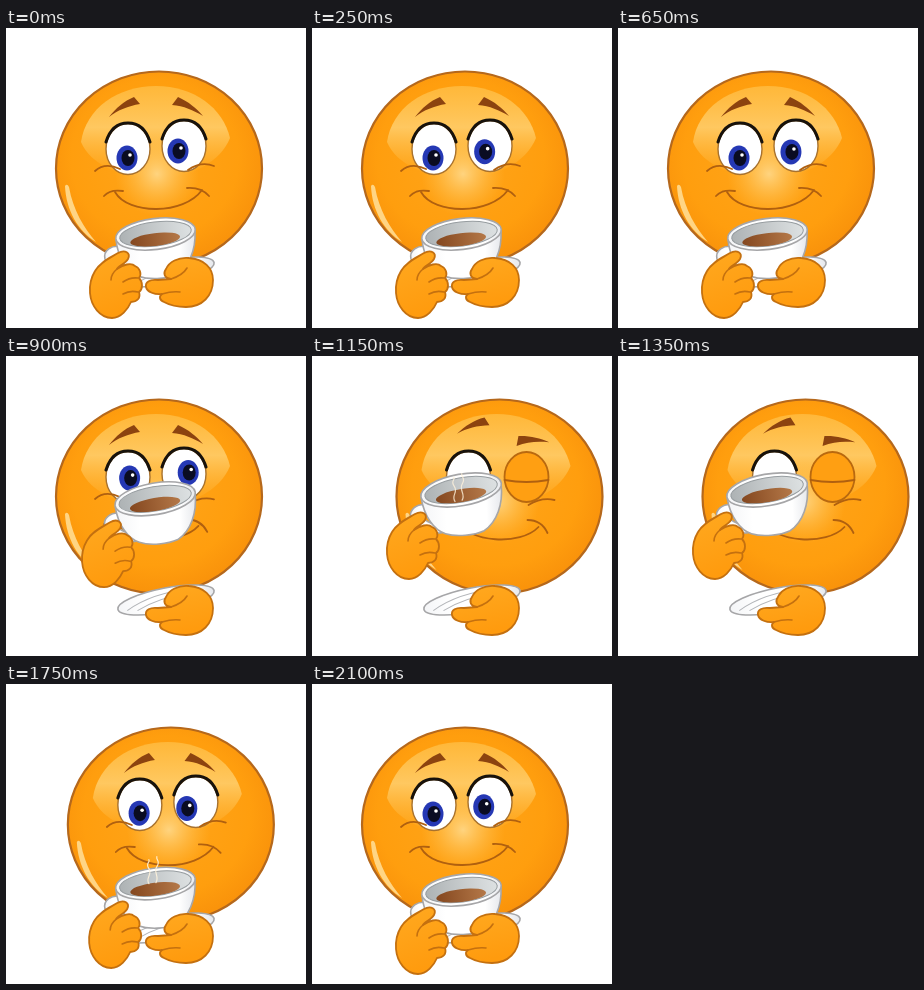
An HTML page for the animation above (2200 ms loop, 300 by 300 pixels).

```html
<!DOCTYPE html>
<html lang="en">
<head>
<meta charset="utf-8">
<title>Coffee break</title>
<style>
  html, body { margin: 0; width: 100%; height: 100%; overflow: hidden; background: #fff; }
  svg { display: block; width: 100vw; height: 100vh; }
  .ink, .fold { fill: none; stroke: #b0600f; stroke-width: 1.8; stroke-linecap: round; }
  .fold { stroke: #c4700f; stroke-width: 1.6; }
  .skin { fill: url(#hand); stroke: #c4700f; stroke-width: 1.8; stroke-linejoin: round; }
  .china { fill: url(#china); stroke: #a6a6a8; stroke-width: 1.6; stroke-linejoin: round; }
  .brow { fill: #8c430f; }
</style>
</head>
<body>
<svg viewBox="0 0 300 300">
  <defs>
    <radialGradient id="face" cx=".48" cy=".45" r=".58">
      <stop offset="0" stop-color="#ffa51a"/>
      <stop offset=".7" stop-color="#ff9e0e"/>
      <stop offset="1" stop-color="#f8900a"/>
    </radialGradient>
    <linearGradient id="shine" x1="0" y1="0" x2="0" y2="1">
      <stop offset="0" stop-color="#ffc550" stop-opacity=".65"/>
      <stop offset=".45" stop-color="#ffd274" stop-opacity=".8"/>
      <stop offset="1" stop-color="#ffc04a" stop-opacity="0"/>
    </linearGradient>
    <radialGradient id="glow">
      <stop offset="0" stop-color="#ffd98a" stop-opacity=".9"/>
      <stop offset="1" stop-color="#ffc04a" stop-opacity="0"/>
    </radialGradient>
    <linearGradient id="hand" x1="0" y1="0" x2=".3" y2="1">
      <stop offset="0" stop-color="#ffa920"/>
      <stop offset="1" stop-color="#ff9b0e"/>
    </linearGradient>
    <linearGradient id="china">
      <stop offset="0" stop-color="#f4f5f7"/>
      <stop offset=".3" stop-color="#fff"/>
      <stop offset=".8" stop-color="#fff"/>
      <stop offset="1" stop-color="#e6e8ec"/>
    </linearGradient>
    <linearGradient id="inside">
      <stop offset="0" stop-color="#adb2b4"/>
      <stop offset="1" stop-color="#dde1e2"/>
    </linearGradient>
    <linearGradient id="coffee">
      <stop offset="0" stop-color="#84471f"/>
      <stop offset="1" stop-color="#b47848"/>
    </linearGradient>
    <clipPath id="eyeClip"><ellipse rx="22" ry="25.5"/></clipPath>
    <clipPath id="rimClip"><ellipse rx="36" ry="12"/></clipPath>
    <ellipse id="white" rx="22" ry="25.5" fill="#fff" stroke="#a8722e" stroke-width="1.4"/>
    <path id="lash" d="M-22 -7C-18 -20 -10 -26 0 -26S18 -20 22 -7" fill="none" stroke="#17120c" stroke-width="3" stroke-linecap="round"/>
    <g id="ball">
      <ellipse rx="10.5" ry="12.5" fill="#2538b4"/>
      <ellipse cx="1" rx="6.5" ry="8" fill="#0a0c22"/>
      <circle cx="3" cy="-3" r="1.8" fill="#fff"/>
    </g>
  </defs>

  <g id="head">
    <ellipse cx="153" cy="140.500" rx="103" ry="97" fill="url(#face)" stroke="#b5681c" stroke-width="2.200"/>
    <path d="M75 114C80 80 112 58 150 58S217 80 224 110C215 133 186 150 150 150S84 136 75 114Z" fill="url(#shine)"/>
    <circle cx="151" cy="146" r="42" fill="url(#glow)"/>
    <path d="M59 158C60 182 72 203 90 214C78 200 67 182 63 159Q61 155 59 158Z" fill="#ffd584"/>
    <path id="browL" class="brow" d="M103 89C110 80 118 73 128 69L134 76C122 78 112 82 103 89Z"/>
    <path id="browR" class="brow" d="M172 69C183 74 190 80 197 88C187 82 178 78 166 77Z"/>
    <g transform="translate(122 121)">
      <use href="#white"/>
      <g clip-path="url(#eyeClip)"><use id="ballL" href="#ball"/></g>
      <use href="#lash"/>
    </g>
    <g transform="translate(178 118)">
      <g id="open">
        <use href="#white"/>
        <g clip-path="url(#eyeClip)"><use id="ballR" href="#ball"/></g>
        <use href="#lash"/>
      </g>
      <g id="shut" transform="translate(2 3)">
        <ellipse rx="22" ry="25" fill="#ff9f12" stroke="#b9690f" stroke-width="1.800"/>
        <path class="ink" d="M-22 3Q0 7 22 3"/>
      </g>
    </g>
    <path class="ink" d="M89 143Q99 134 114 141M98 168Q104 161 117 163"/>
    <path class="ink" id="smile"/>
  </g>

  <g transform="translate(160 244) rotate(-11)">
    <ellipse class="china" rx="49" ry="12"/>
    <path d="M-40 3Q-12 -10 28 -6M-30 5Q-6 -4 20 -2" fill="none" stroke="#b4b6ba"/>
  </g>

  <g id="cup">
    <path class="china" d="M117 219C105 216 97 223 99 231C102 240 116 247 128 247L127 240C118 238 110 233 110 229Q112 225 120 228Z"/>
    <path class="china" d="M110 212C112 230 121 244 132 248C143 252 160 251 170 247C183 239 190 222 189 203Z"/>
    <g transform="translate(149.500 206) rotate(-7)">
      <ellipse class="china" rx="40" ry="15.500"/>
      <ellipse rx="36" ry="12" fill="url(#inside)" stroke="#979da0"/>
      <ellipse cx="-1" cy="5.500" rx="25" ry="6.500" fill="url(#coffee)" clip-path="url(#rimClip)"/>
    </g>
    <path id="steam" d="M143 205C139 199 147 196 143 190S145 184 143 181M150 204C154 198 147 194 151 188S150 182 151 178"
      fill="none" stroke="#fff3dc" stroke-width="1.200" stroke-linecap="round"/>
  </g>

  <g id="handL">
    <path class="skin" d="M89 243C94 234 104 230 112 225C119 221 125 225 122 231C119 236 112 238 111 241C117 237 125 234 129 238C134 240 136 246 133 250C137 254 137 261 133 264C135 270 131 274 125 274C122 281 115 290 106 290C94 290 85 278 84 265Q83 253 89 243Z"/>
    <path class="fold" d="M111 241Q105 246 105 252M132 250Q124 249 117 254M132 264Q124 262 117 266"/>
  </g>
  <g>
    <path class="skin" d="M160 241C163 234 172 229 183 230C198 231 207 240 207 252C207 268 196 279 180 279Q167 279 158 274C153 272 153 268 156 266C149 267 141 264 140 259S144 251 152 252L165 251C158 250 157 245 160 241Z"/>
    <path class="fold" d="M165 251Q177 247 181 240M156 266Q166 263 174 264"/>
  </g>
</svg>
<script>
  const LOOP = 2200, STEP = 50;
  const el = id => document.getElementById(id);

  function ease(t, from, to) {
    const p = Math.min(1, Math.max(0, (t - from) / (to - from)));
    return p * p * (3 - 2 * p);
  }
  // Rises from 0 to 1 over a..b and falls back over c..d.
  const pulse = (t, a, b, c, d) => ease(t, a, b) - ease(t, c, d);

  function move(id, x, y, extra = "") {
    el(id).setAttribute("transform", `translate(${x} ${y}) ${extra}`);
  }

  function draw(t) {
    const lift = pulse(t, 650, 970, 1440, 1820);
    const turn = pulse(t, 900, 1100, 1550, 1880);
    const wink = pulse(t, 1030, 1130, 1380, 1500);
    const drift = Math.sin(2 * Math.PI * t / LOOP);

    move("head", 34.5 * turn, 0);
    move("cup", -3.5 * lift, -76 * lift, `rotate(${-3 * lift} 150 208) scale(${1 + .02 * lift})`);
    move("handL", -9 * lift, -67 * lift);

    move("ballL", -1 + 3 * lift, 9 - 9 * lift + 14 * wink);
    move("ballR", -6 + drift + 11 * lift - 9 * turn, 5 + drift - 8 * lift + 9 * turn);
    el("open").style.display = wink < .5 ? "" : "none";
    el("shut").style.display = wink < .5 ? "none" : "";

    move("browL", 9 * turn, -9 * wink, `rotate(${8 * wink} 118 77)`);
    move("browR", 2 * turn, 6 * wink, `rotate(${-26 * wink} 182 76)`);
    el("smile").setAttribute("d", `
      M109 164C122 187 ${178 - 4 * lift} ${187 + 3 * lift} ${196 - 4 * lift} ${162 + 9 * lift}
      M181 ${160 + 4 * lift}Q195 ${159 + 5 * lift} ${203 - 2 * lift} ${168 + 9 * lift}
      M182 ${142 + 7 * lift}Q195 ${133 + 8 * lift} 208 ${138 + 6 * lift}`);

    el("steam").style.opacity = .9 * Math.max(0, Math.cos(2 * Math.PI * (t - 450) / 650));
    move("steam", 0, 12 * lift);
  }

  const start = performance.now();
  function tick(now) {
    const t = Math.max(0, now - start) % LOOP;
    draw(Math.min(Math.floor(t / STEP) * STEP, LOOP - 2 * STEP));
    requestAnimationFrame(tick);
  }
  draw(0);
  requestAnimationFrame(tick);
</script>
</body>
</html>
```
